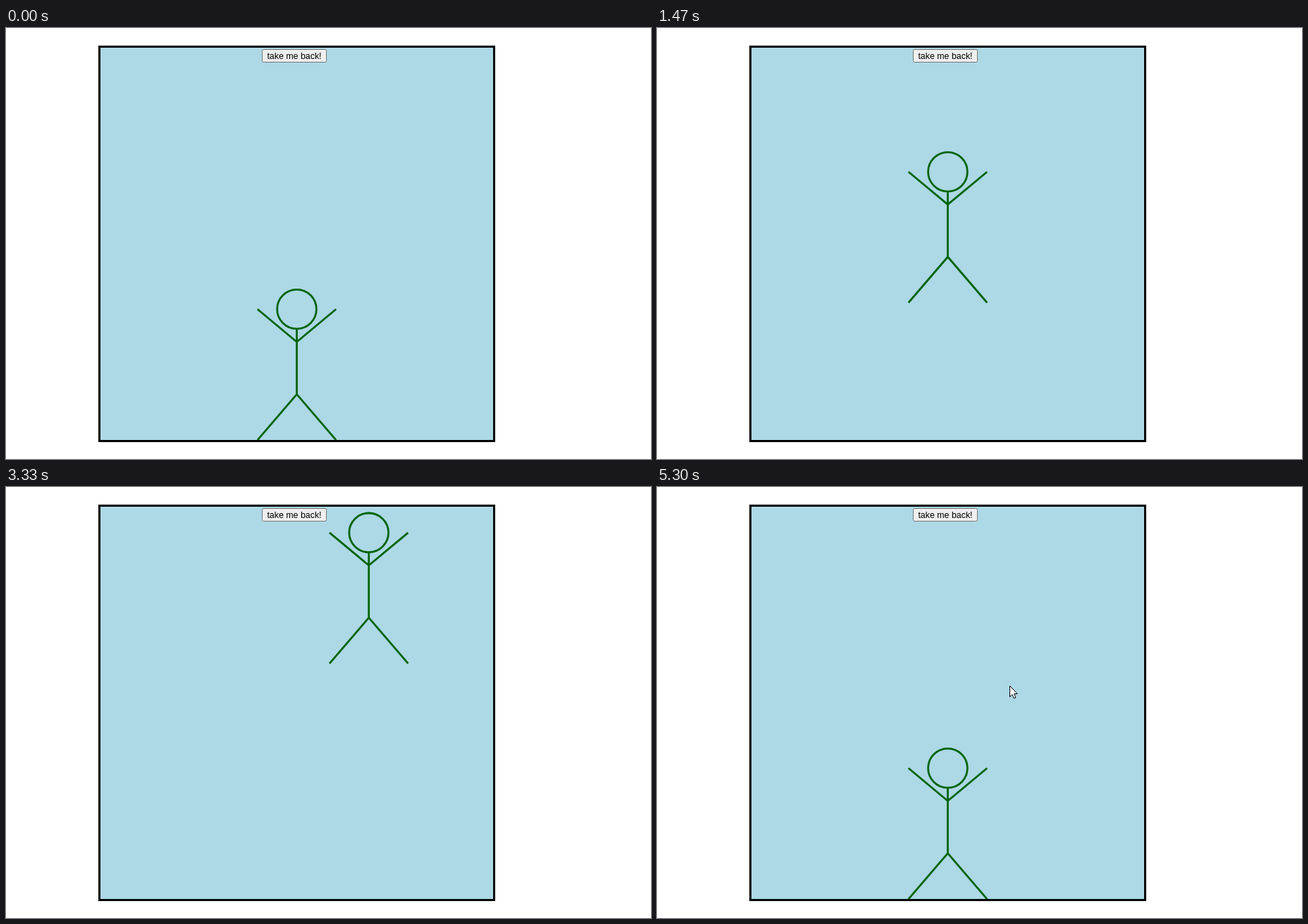
These frames come from a looping animation (915x612 px, 5.4 s). An HTML page:

```html
<!DOCTYPE html>
<html lang="en">
<head>
<meta charset="utf-8">
<title>Stick figure</title>
<style>
  html, body { margin: 0; width: 100%; height: 100%; overflow: hidden; background: #fff; }
  svg { display: block; }
  text { font: 12.4px "Liberation Sans", Arial, sans-serif; text-anchor: middle; }
</style>
</head>
<body>
<svg width="915" height="612" viewBox="0 0 915 612">
  <rect x="132.5" y="26.5" width="560" height="560" fill="#add8e6" stroke="#000" stroke-width="3"/>
  <svg x="133.8" y="27.7" width="557.4" height="557.4" viewBox="0 0 600 600">
    <g id="figure" fill="none" stroke="#006400" stroke-width="3">
      <circle cx="300" cy="400" r="30"/>
      <path d="M300 430V530M240 400L300 450L360 400M240 600L300 530L360 600"/>
    </g>
  </svg>
  <rect id="button" x="363.5" y="30.5" width="91" height="18" rx="2"/>
  <text x="409" y="44">take me back!</text>
  <path id="cursor" d="M.5 .5V16L4 12.7L6.4 18.2L8.9 17.1L6.5 11.7H11.3Z" fill="#fff" stroke="#000"/>
</svg>
<script>
const LOOP = 5400;
const STEP = 10;
const figure = document.getElementById('figure');
const button = document.getElementById('button');
const cursor = document.getElementById('cursor');

// Time, x and y of each pointer position; each is held until the next.
const pointerStops = [
  [3820, 862, 343], [3910, 660, 235], [4010, 493, 126], [4110, 415, 70],
  [4210, 386, 46], [4300, 395, 43], [5200, 440, 130], [5300, 500, 282]
];

const buttonStyles = {
  idle: ['#efefef', '#767676'],
  hover: ['#e5e5e5', '#4f4f4f'],
  active: ['#f5f5f5', '#8d8d8d']
};

const press = (t, at) => t >= at ? 1 : 0;

// Steps made by a repeating key, seen once per tick.
function repeat(t, start, limit, tick = 96) {
  const ticks = Math.max(0, Math.floor((t - start) / tick));
  return Math.min(limit, Math.round(ticks * 3.2));
}

function figureSteps(t) {
  if (t >= 4700) return [0, 0];
  const right = press(t, 1660) + 3 * press(t, 2260) + repeat(t, 2260, 7, 90) - press(t, 3720);
  const up = press(t, 390) + press(t, 890) + repeat(t, 890, 22)
    + press(t, 2530) + press(t, 3030) + repeat(t, 3030, 11);
  return [right, up];
}

function buttonState(t) {
  if (t < 4300 || t >= 5200) return 'idle';
  return t >= 4600 && t < 4700 ? 'active' : 'hover';
}

function draw(now) {
  const t = now % LOOP;
  const [right, up] = figureSteps(t);
  figure.setAttribute('transform', `translate(${right * STEP} ${-up * STEP})`);

  const [fill, stroke] = buttonStyles[buttonState(t)];
  button.setAttribute('fill', fill);
  button.setAttribute('stroke', stroke);

  const stop = pointerStops.filter(([start]) => t >= start).pop();
  cursor.setAttribute('visibility', stop ? 'visible' : 'hidden');
  if (stop) cursor.setAttribute('transform', `translate(${stop[1]} ${stop[2]})`);
}

function frame() {
  draw(performance.now());
  requestAnimationFrame(frame);
}
frame();
</script>
</body>
</html>
```
